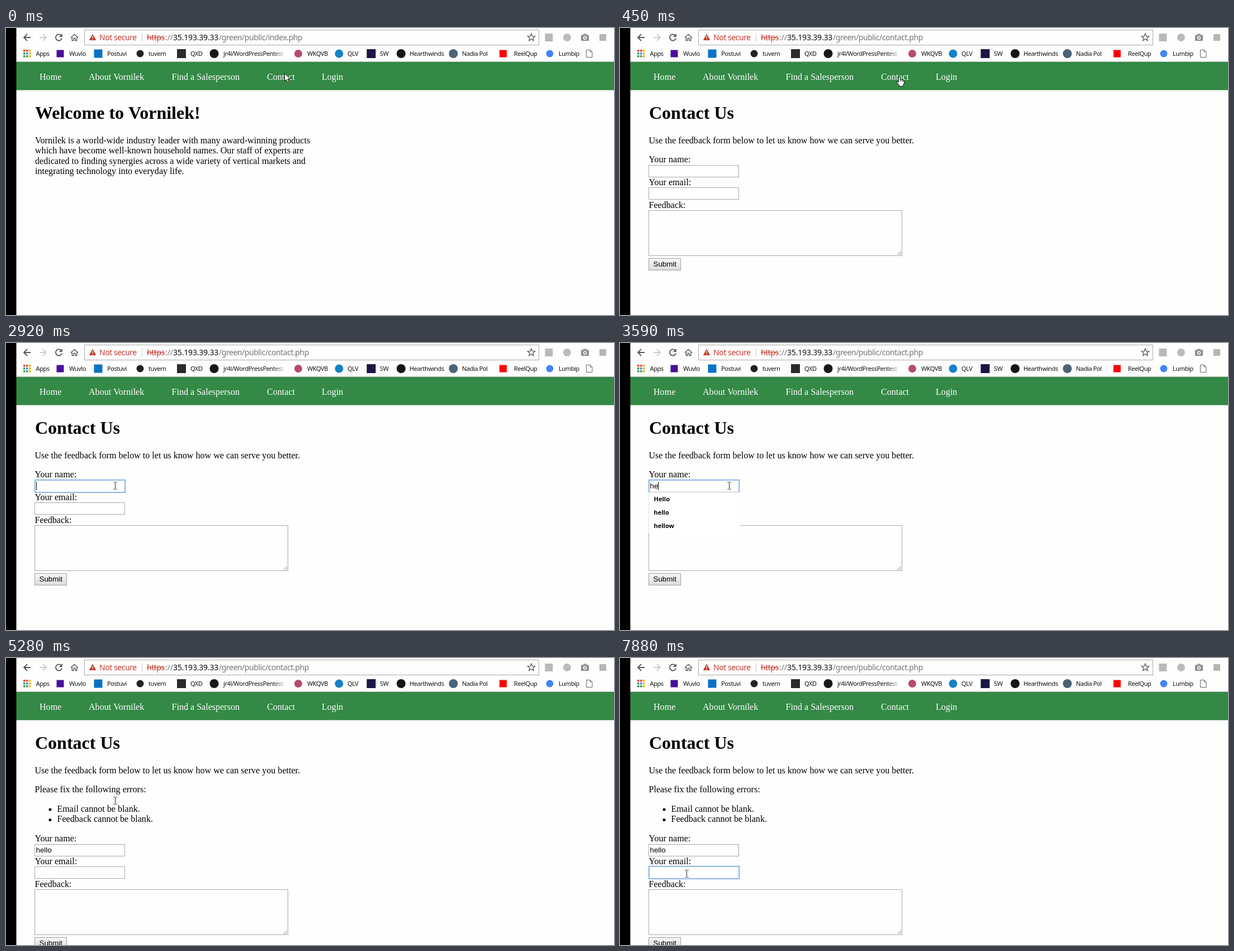
Write an HTML page with a canvas that moves like this. It is 1088x515 px and loops after 8 s.

```html
<!DOCTYPE html>
<html lang="en">
<head>
<meta charset="utf-8">
<title>Contact form</title>
<style>
html, body { margin: 0; width: 100%; height: 100%; overflow: hidden; background: #fff; }
canvas { display: block; }
</style>
</head>
<body>
<canvas id="stage" width="1088" height="515"></canvas>
<script>
const ctx = document.getElementById('stage').getContext('2d');
const LOOP = 8000;
const COMPANY = 'Vornilek';
const SERIF = '16.08px "Liberation Serif", serif';
const HEADING = 'bold 32px "Liberation Serif", serif';
const FIELD = '13.33px "Liberation Sans", sans-serif';
const URL_FONT = '14px "Noto Sans", sans-serif';
const MARK_FONT = '11px "Noto Sans", sans-serif';
const BOLD_ITEM = 'bold 11px "Noto Sans", sans-serif';

// [start ms, shape, x, y]
const CURSOR = [
  [0, 'arrow', 498, 81], [300, 'hand', 503, 82], [450, 'hand', 500, 87],
  [970, 'arrow', 462, 115], [1090, 'arrow', 342, 174], [1240, 'arrow', 271, 209],
  [1360, 'arrow', 230, 256], [1510, 'beam', 206.5, 266], [1660, 'beam', 200.5, 261],
  [1780, 'beam', 195.5, 256], [6390, 'arrow', 142, 311], [6540, 'beam', 115.5, 340],
  [6680, 'beam', 117.5, 380], [6810, 'beam', 119.5, 411], [6950, 'beam', 119.5, 403],
  [7080, 'beam', 119.5, 394], [7230, 'beam', 119.5, 387]
];
const TYPED = [[0, ''], [3200, 'h'], [3590, 'he'], [3840, 'hel'], [3960, 'hell'], [4340, 'hello']];

const CURSOR_PATH = {
  arrow: new Path2D('M.5 .5V14.5L3.7 11.5L6.2 17L8.5 16L6.1 10.7H10.3Z'),
  hand: new Path2D('M-1.5 1Q0 -1 1.5 1V5L7 6.5Q8.5 7 8.5 9V12L7 14V17.5H-.5V15.5L-4.5 11Q-5 8.5 -3 9L-1.5 10.5Z')
};

const BOOKMARKS = [
  // text, text x, icon shape, icon x, icon size, icon colour
  ['Wuvlo', 113, 'square', 97, 13, '#4a0e99'],
  ['Postuvi', 181, 'square', 165, 15, '#0a72c6'],
  ['tuvern', 255, 'circle', 240, 13, '#222'],
  ['QXD', 330, 'square', 314, 16, '#2b2b2b'],
  ['jr4l/WordPressPentest', 389, 'circle', 372.5, 16, '#181818'],
  ['WKQVB', 539, 'circle', 523, 14, '#b64a72'],
  ['QLV', 611, 'circle', 596, 15, '#1682c5'],
  ['SW', 669, 'square', 653.5, 16, '#1b1745'],
  ['Hearthwinds', 722, 'circle', 707, 16, '#151515'],
  ['Nadia Pol', 816, 'circle', 800.5, 16, '#4a6377'],
  ['ReelQup', 909, 'square', 889.5, 13, '#f00'],
  ['Lumbip', 989, 'circle', 973, 13, '#4285f4']
];

const latest = (steps, t) => steps.filter(s => s[0] <= t).pop();
const within = (t, a, b) => t >= a && t < b;

function text(str, x, y, font, color = '#000', spacing = 0) {
  ctx.font = font;
  ctx.fillStyle = color;
  ctx.letterSpacing = spacing + 'px';
  ctx.fillText(str, x, y);
}

function rect(x, y, w, h, color) {
  ctx.fillStyle = color;
  ctx.fillRect(x, y, w, h);
}

function frame(x, y, w, h, color) {
  ctx.strokeStyle = color;
  ctx.lineWidth = 1;
  ctx.strokeRect(x + .5, y + .5, w - 1, h - 1);
}

function line(d, color, width = 1, fill) {
  const path = new Path2D(d);
  if (fill) { ctx.fillStyle = fill; ctx.fill(path); }
  ctx.strokeStyle = color;
  ctx.lineWidth = width;
  ctx.stroke(path);
}

function blob(shape, x, y, size, color) {
  if (shape === 'square') return rect(x - size / 2, y - size / 2, size, size, color);
  ctx.fillStyle = color;
  ctx.beginPath();
  ctx.arc(x, y, size / 2, 0, 7);
  ctx.fill();
}

function star(cx, cy, outer, inner) {
  let d = '';
  for (let i = 0; i < 10; i++) {
    const r = i % 2 ? inner : outer, a = i * Math.PI / 5 - Math.PI / 2;
    d += (i ? 'L' : 'M') + (cx + r * Math.cos(a)) + ' ' + (cy + r * Math.sin(a));
  }
  line(d + 'Z', '#555', 1.3);
}

function drawToolbar(t) {
  line('M44 17H32.5M38 11L32 17L38 23', '#555', 1.8);
  line('M60 17H71.5M66 11L72 17L66 23', '#ccc', 1.8);
  if (within(t, 150, 450)) {
    line('M89.5 11.5L100 22M100 11.5L89.5 22', '#555', 1.9);
  } else {
    line('M98.5 13A5.6 5.6 0 1 0 100 18.5', '#555', 1.8);
    line('M100.5 10.5V15.8H95.2Z', '#555', .5, '#555');
  }
  line('M116 17.5L122.5 11.3L129 17.5M118.2 16V22.5H121V18.5H124V22.5H126.8V16', '#555', 1.3);

  frame(140, 3, 814, 28, '#a9a9a9');
  line('M155 11.5L160.5 21.5H149.5Z', '#c5392c', 1, '#c5392c');
  rect(154.3, 14.5, 1.4, 3.5, '#fff');
  rect(154.3, 19, 1.4, 1.4, '#fff');
  text('Not secure', 167, 22, URL_FONT, '#c5392c', -.45);
  rect(243, 9, 1, 16, '#c9c9c9');
  text('https', 252, 22, URL_FONT, '#c5392c', -.45);
  rect(252, 17, 32, 1, '#c5392c');
  text('://', 285, 22, URL_FONT, '#777', -.1);
  text('35.193.39.33', 299, 22, URL_FONT, '#111', -.18);
  const page = t < 450 ? 'index' : 'contact';
  text(`/green/public/${page}.php`, 381, 22, URL_FONT, '#757575', -.45);
  star(940, 17, 7, 3);

  blob('square', 971.5, 17, 14, '#b9b9b9');
  blob('circle', 1004, 17, 14, '#bbb');
  rect(1029, 12.5, 14, 10.5, '#8c8c8c');
  rect(1033, 10.5, 6, 2, '#8c8c8c');
  blob('circle', 1036, 17.7, 6.5, '#fff');
  blob('circle', 1036, 17.7, 3.5, '#8c8c8c');
  blob('square', 1068, 17, 12, '#b5b5b5');
}

function drawBookmarks() {
  const dots = ['#e34133', '#e34133', '#f0b400', '#2f9e56', '#4285f4', '#f0b400', '#2f9e56', '#2f9e56', '#f0b400'];
  dots.forEach((c, i) => rect(31 + i % 3 * 5, 39 + Math.floor(i / 3) * 5, 3.5, 3.5, c));
  text('Apps', 53.5, 50, MARK_FONT, '#111', -.4);
  for (const [label, x, shape, ix, size, color] of BOOKMARKS) {
    blob(shape, ix, 46, size, color);
    let ink = '#111';
    if (label.length > 15) {
      ink = ctx.createLinearGradient(478, 0, 503, 0);
      ink.addColorStop(0, '#111');
      ink.addColorStop(1, '#1110');
    }
    text(label, x, 50, MARK_FONT, ink, -.4);
  }
  line('M1038.5 39.5H1045.5L1049 43V52.5H1038.5ZM1045.5 39.5V43H1049', '#666', 1);
}

function drawNav() {
  rect(19, 60, 1069, 1, '#b8bdb8');
  rect(18, 61, 1070, 50.5, '#338945');
  const items = [['Home', 60], ['About ' + COMPANY, 148], ['Find a Salesperson', 296.5], ['Contact', 467], ['Login', 565]];
  for (const [label, x] of items) text(label, x, 93, SERIF, '#fff');
}

function drawWelcome() {
  text(`Welcome to ${COMPANY}!`, 52, 163, HEADING);
  [
    COMPANY + ' is a world-wide industry leader with many award-winning products',
    'which have become well-known household names. Our staff of experts are',
    'dedicated to finding synergies across a wide variety of vertical markets and',
    'integrating technology into everyday life.'
  ].forEach((s, i) => text(s, 52, Math.round(207 + i * 18.4), SERIF));
}

function drawInput(y, value, focused, caret) {
  rect(51, y, 162, 22, '#fff');
  if (focused) {
    frame(51, y - 1, 163, 24, '#6fa5e8');
    frame(52, y, 161, 22, '#a8c8f0');
  } else {
    frame(51, y, 162, 22, '#a9a9a9');
  }
  text(value, 53.5, y + 15, FIELD);
  if (caret) rect(Math.round(54 + ctx.measureText(value).width - (value ? 1 : 0)), y + 3, 1, 15, '#000');
}

function drawSuggestions() {
  rect(52, 267, 163, 75, '#fff');
  rect(52, 267, 162, 1, '#bdbdbd');
  rect(51, 268, 1, 74, '#e2e2e2');
  ['Hello', 'hello', 'hellow'].forEach((s, i) => text(s, 60.5, 284 + i * 24, BOLD_ITEM));
}

function drawContact(t) {
  const rejected = t >= 5280;
  text('Contact Us', 52, 163, HEADING);
  text('Use the feedback form below to let us know how we can serve you better.', 51.5, 207, SERIF);
  if (rejected) {
    text('Please fix the following errors:', 51.5, 241, SERIF);
    ['Email', 'Feedback'].forEach((s, i) => {
      blob('circle', 79, 272 + i * 18.5, 5, '#000');
      text(s + ' cannot be blank.', 91.5, 276 + i * 18, SERIF);
    });
  }

  ctx.save();
  ctx.translate(0, rejected ? 88 : 0);
  text('Your name:', 51.5, 241, SERIF);
  const typing = within(t, 1930, 5280);
  const nameCaret = within(t, 1930, 2460) || within(t, 2920, 4880);
  drawInput(246, latest(TYPED, t)[1], typing, nameCaret);
  text('Your email:', 51.5, 282, SERIF);
  drawInput(286, '', t >= 7350, within(t, 7350, 7880));
  text('Feedback:', 51.5, 323, SERIF);
  frame(51, 327, 454, 82, '#a9a9a9');
  line('M497 407L503 401M500.5 407L503 404.5', '#777', 1);

  const face = ctx.createLinearGradient(0, 413, 0, 435);
  face.addColorStop(0, '#f7f7f7');
  face.addColorStop(1, '#dcdcdc');
  rect(51, 413, 58, 22, face);
  frame(51, 413, 58, 22, '#a0a0a0');
  text('Submit', 59.5, 428, FIELD);
  ctx.restore();

  if (within(t, 3200, 5280)) drawSuggestions();
}

function drawCursor(t) {
  const [, shape, x, y] = latest(CURSOR, t);
  ctx.save();
  ctx.translate(x, y);
  if (shape === 'beam') {
    line('M-3 -6.5H-1L0 -5.5L1 -6.5H3M0 -5.5V5.5M-3 6.5H-1L0 5.5L1 6.5H3', '#222', 1);
  } else {
    ctx.fillStyle = '#fff';
    ctx.strokeStyle = '#111';
    ctx.lineWidth = 1;
    ctx.fill(CURSOR_PATH[shape]);
    ctx.stroke(CURSOR_PATH[shape]);
    if (shape === 'hand') line('M1.5 5V9M4 6V9.5M6.4 7V10', '#111', .8);
  }
  ctx.restore();
}

function render() {
  const t = performance.now() % LOOP;
  rect(0, 0, 1088, 515, '#fefefe');
  drawToolbar(t);
  drawBookmarks();
  drawNav();
  if (t < 450) drawWelcome();
  else drawContact(t);
  rect(0, 0, 18.5, 515, '#000');
  drawCursor(t);
  requestAnimationFrame(render);
}
render();
</script>
</body>
</html>
```
